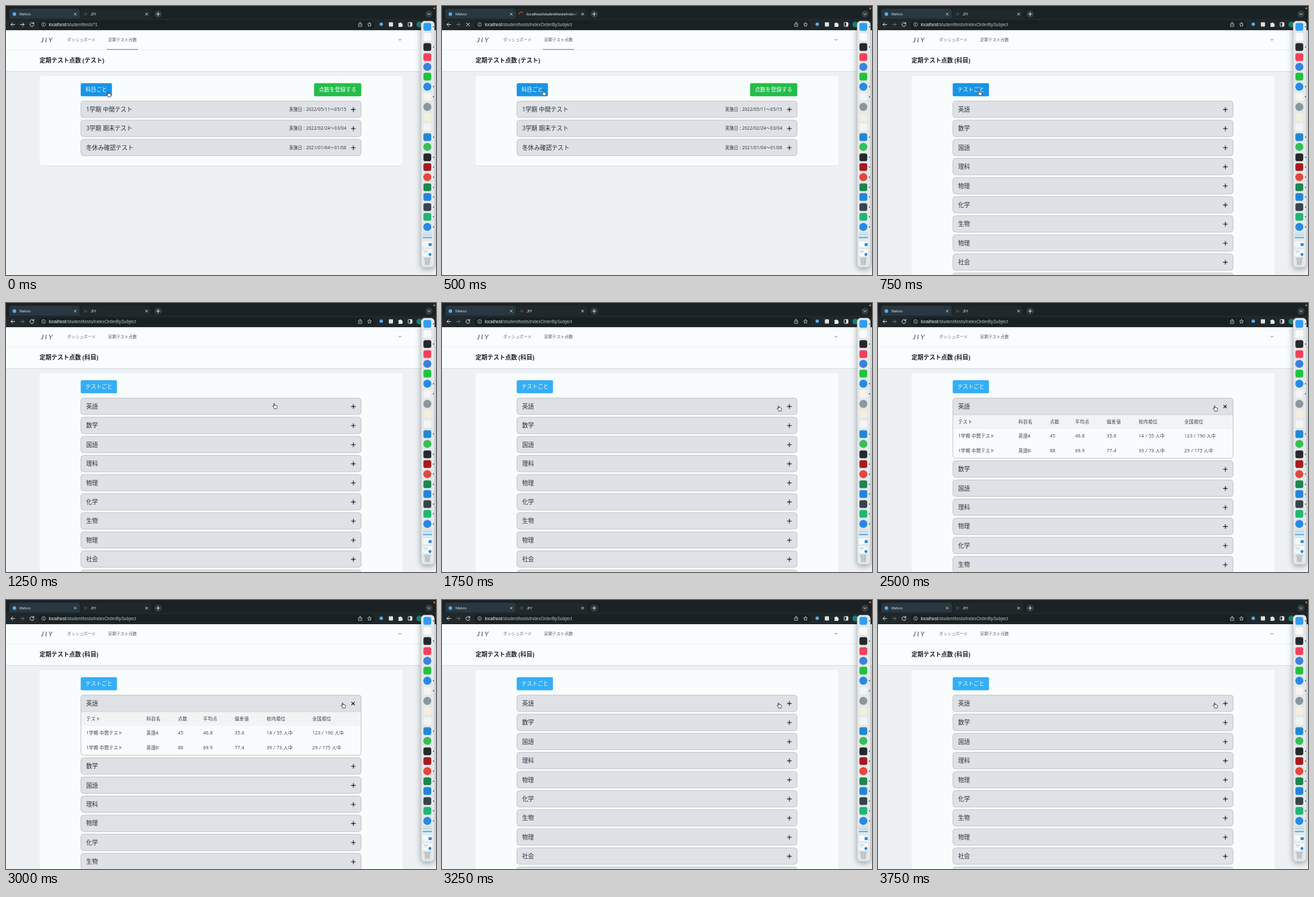
Animation, 640 px wide and 400 px high, one loop 4000 ms. Source, as an HTML page:

```html
<!DOCTYPE html>
<html lang="ja">
<head>
<meta charset="utf-8">
<title>Test scores</title>
<style>
html, body { margin: 0; width: 100%; height: 100%; overflow: hidden; background: #eef1f2; }
svg { display: block; width: 640px; height: 400px; font-family: "Open Sans", "Noto Sans CJK JP", "Noto Sans CJK", sans-serif; }
.ui { font-family: "Liberation Sans", Arial, sans-serif; }
.icon { fill: none; stroke: #dfe5e6; stroke-width: .9; stroke-linecap: round; stroke-linejoin: round; }
.panel { filter: drop-shadow(0 2px 4px rgba(20, 30, 35, .42)); }
text { white-space: pre; }
</style>
</head>
<body>
<svg id="stage" viewBox="0 0 640 400"></svg>
<script>
const INK = '#2b3037', PAPER = '#f9fcfc';

const rect = (x, y, w, h, fill, rx = 0, more = '') =>
  `<rect x="${x}" y="${y}" width="${w}" height="${h}" rx="${rx}" fill="${fill}" ${more}/>`;
const circle = (x, y, r, fill, more = '') =>
  `<circle cx="${x}" cy="${y}" r="${r}" fill="${fill}" ${more}/>`;
const text = (x, y, size, str, fill = INK, more = '') =>
  `<text x="${x}" y="${y}" font-size="${size}" fill="${fill}" ${more}>${str}</text>`;
const line = (d, stroke = '#dfe5e6', w = .9) =>
  `<path class="icon" d="${d}" style="stroke:${stroke};stroke-width:${w}"/>`;
const group = (id, body) => `<g id="${id}">${body}</g>`;
const plus = (x, y, r, color, w) => line(`M${x - r} ${y}h${2 * r}M${x} ${y - r}v${2 * r}`, color, w);
const cross = (x, y, r, color, w) => line(`M${x - r} ${y - r}l${2 * r} ${2 * r}m0 ${-2 * r}l${-2 * r} ${2 * r}`, color, w);

function browser() {
  const url = (id, rest) => group(id,
    `<text class="ui" x="63.5" y="29.6" font-size="6.63" fill="#b4bdc0"><tspan fill="#f4f7f7">localhost</tspan>${rest}</text>`);
  return rect(0, 0, 640, 36, '#1b2225') +
    rect(5, 4, 105, 17, '#283740', 4) +
    `<path d="M107 19q4 0 4-4V8q0-4 4-4h97q4 0 4 4v7q0 4 4 4z" fill="#20282b"/>` +
    rect(0, 18.5, 640, 17.5, '#20282b') +
    rect(48, 21.2, 501, 12.6, '#182022', 6.3) +
    circle(12.5, 12, 2.7, '#5aa9e6') +
    text(20, 14, 5.8, 'Melvio', '#d3dadc', 'class="ui"') +
    cross(103, 12, 1.7, '#c9d1d3', .8) + cross(209.3, 12, 1.7, '#e8eded', .8) +
    circle(226.5, 12, 5.6, '#30393d') + plus(226.5, 12, 2.4, '#dfe5e6', .9) +
    circle(629.5, 12, 5.2, '#343d41') + line('M627.6 11.2l1.9 1.9 1.9-1.9') +
    circle(637.3, 3.5, 1.3, '#e98a35') +
    group('favicon', rect(116, 10, 5, 4, '#343e42')) +
    group('spinner', line('M114.9 12a3.1 3.1 0 0 1 5.3-2.2', 'currentColor', 1)) +
    group('title', text(126, 14, 5.8, 'JIY', '#eef2f2', 'class="ui"')) +
    group('urlTitle', `<svg x="126" y="5" width="77" height="14">` +
      text(0, 9, 5.8, 'localhost/student/tests/indexOrder', 'url(#fade)', 'class="ui"') + '</svg>') +
    line('M13 27.5H7.4m2.5-2.6l-2.6 2.6 2.6 2.6') +
    group('forward', line('M21.3 27.5h5.6m-2.5-2.6l2.6 2.6-2.6 2.6', 'currentColor')) +
    group('reload', line('M40.9 25.7a2.9 2.9 0 1 0 .6 2.4M41.3 24.4v1.8h-1.9')) +
    group('stop', cross(38.6, 27.5, 2.2, '#e4eaea', 1)) +
    circle(56, 27.5, 2.8, 'none', 'stroke="#c3cccf" stroke-width=".7"') + line('M56 27.2v1.5M56 25.9v.1', '#c3cccf', .7) +
    url('urlA', '/student/tests?1') + url('urlB', '/student/tests/indexOrderBySubject') +
    line('M525.8 26.4h-1.1v4h4.8v-4h-1.1M527.1 28.6v-4.4m-1.3 1.2l1.3-1.3 1.3 1.3', '#cdd5d7', .7) +
    line('M541 24.5l.9 2 2.1.2-1.6 1.4.5 2.1-1.9-1.1-1.9 1.1.5-2.1-1.6-1.4 2.1-.2z', '#d4dcdd', .7) +
    circle(558.5, 27, 2.6, '#5aa9e6') + rect(569.8, 24.3, 6.2, 6.2, '#dde3e4', .8) +
    '<path d="M584 25.6h1.7a1.2 1.2 0 0 1 2.4 0h1.7v1.8a1.2 1.2 0 0 1 0 2.3v1.4H584v-1.5a1.2 1.2 0 0 0 0-2.2z" fill="#e5eaea"/>' +
    rect(598.6, 24.6, 5.6, 5.6, 'none', .6, 'stroke="#eef2f2" stroke-width=".9"') + rect(601.6, 24.6, 2.6, 5.6, '#eef2f2') +
    circle(615.2, 27.5, 4.3, '#16867a');
}

function header() {
  return rect(0, 36, 640, 61, '#fafdfd') + rect(0, 64.6, 640, .8, '#e8ecee') + rect(0, 96.8, 640, 1, '#d9dee0') +
    text(52, 53.8, 10.3, 'JIY', '#41464b', 'font-style="italic" letter-spacing="2.2" style="font-family:Lato,sans-serif"') +
    text(91, 52.3, 6.1, 'ダッシュボード', '#6d737b') +
    text(152, 52.3, 6.1, '定期テスト点数', '#545a62') +
    line('M584.6 49.3l1.8 1.8 1.8-1.8', '#596068', .8);
}

const heading = kind => text(50, 83.8, 8.8, `定期テスト点数 (${kind})`, '#20252c', 'font-weight="700"');
const button = (id, x, w, label, fill) =>
  rect(x, 114.7, w, 19.5, fill, 2, `id="${id}"`) + text(x + 7.1, 127.3, 8, label, '#f5fbff');

function row(y, label, date = '') {
  return rect(111.5, y - 12.2, 417, 24.4, '#dee1e5', 4, 'stroke="#bfc4c9" stroke-width=".9"') +
    text(119.3, y + 3.3, 8.8, label) +
    (date && text(506.7, y + 2.3, 6.3, `実施日 : ${date}`, INK, 'text-anchor="end" letter-spacing=".22"')) +
    plus(517, y + .3, 3, '#23272c', 1.1);
}
const rowY = i => 153.6 + 28.4 * i;

function testPage() {
  const tests = [
    ['1学期 中間テスト', '2022/05/11〜05/15'],
    ['3学期 期末テスト', '2022/02/24〜03/04'],
    ['冬休み確認テスト', '2021/01/04〜01/06']];
  return rect(50, 104.8, 540, 133, '#dde2e4', 3) + rect(50, 104, 540, 133, PAPER, 3) + heading('テスト') +
    rect(150, 64, 46.7, 1.1, '#5f94dc') +
    button('subjectButton', 111.2, 46.5, '科目ごと', '#1994e5') +
    button('addButton', 458.5, 70.3, '点数を登録する', '#24bd49') +
    tests.map((t, i) => row(rowY(i), ...t)).join('');
}

function scoreTable() {
  const columns = [119.5, 209, 256, 293.5, 340.5, 388, 456];
  const cells = (y, list, more) => list.map((s, i) => text(columns[i], y, 6.6, s, '#343a42', more)).join('');
  return rect(111.5, 141.4, 417, 89.4, PAPER, 4) +
    `<path d="M111.5 166v-20.6q0-4 4-4h409q4 0 4 4V166z" fill="#dee1e5"/>` +
    rect(112, 166, 416, 21.3, '#f1f4f5') + rect(112, 165.6, 416, .8, '#c6cacf') +
    rect(111.5, 141.4, 417, 89.4, 'none', 4, 'stroke="#bfc4c9" stroke-width=".9"') +
    text(119.3, 156.9, 8.8, '英語') + cross(516.6, 153.9, 2.1, '#23272c', 1.1) +
    cells(178.9, ['テスト', '科目名', '点数', '平均点', '偏差値', '校内順位', '全国順位'], 'font-weight="500" letter-spacing=".5"') +
    cells(200.4, ['1学期 中間テスト', '英語A', '45', '46.8', '35.6', '14 / 55 人中', '123 / 190 人中'], 'letter-spacing=".3"') +
    cells(221.6, ['1学期 中間テスト', '英語B', '88', '69.9', '77.4', '39 / 73 人中', '29 / 175 人中'], 'letter-spacing=".3"');
}

function subjectPage() {
  const subjects = ['英語', '数学', '国語', '理科', '物理', '化学', '生物', '物理', '社会', '地理'];
  const rows = subjects.map((s, i) => row(rowY(i), s));
  return rect(50, 104, 540, 300, PAPER, 3) + heading('科目') +
    button('testButton', 111.2, 54, 'テストごと', '#1994e5') +
    group('closedRow', rows[0]) + group('table', scoreTable()) +
    group('otherRows', rows.slice(1).join(''));
}

function dock() {
  // shape (square or circle), y, colour, running
  const apps = [
    ['s', 31, '#2f9df0', 1], ['s', 46, '#fafafa'], ['s', 61, '#25292b', 1], ['s', 76, '#f5405a'],
    ['c', 90.5, '#3f7fdc'], ['s', 105, '#20c33c'], ['c', 120, '#2789e6', 1], ['s', 135, '#f4f4f2', 1],
    ['c', 150, '#8b979c'], ['s', 165, '#f3eedd'], ['s', 180, '#f3f5f5'], ['s', 195, '#2487d2', 1],
    ['c', 209.5, '#39bd57'], ['s', 225, '#25292b', 1], ['s', 239.5, '#a51b1f', 1], ['c', 254.5, '#e2483b', 1],
    ['s', 269.5, '#1d8650', 1], ['s', 284, '#2285dc', 1], ['s', 299, '#39434c', 1], ['s', 313.5, '#22b573', 1],
    ['c', 328.5, '#2789e6', 1]];
  const icon = ([shape, y, color, on]) =>
    (shape === 's' ? rect(621.3, y - 5.7, 11.6, 11.4, color, 2.8) : circle(627.1, y, 6, color)) +
    (on ? `<path d="M636.8 ${y - 1.3}v2.6l-1.7-1.3z" fill="#33383b"/>` : '');
  return rect(618, 22.5, 19.5, 366, '#e3e8ea', 5, 'class="panel" stroke="#cbd2d5" stroke-width=".6"') +
    apps.map(icon).join('') +
    rect(621, 336.6, 13, .6, '#bcc5c9') +
    rect(620.5, 339.5, 13.5, 1, '#8dc8ee') + rect(620.5, 343.5, 13.5, 1.7, '#40a9e8') +
    rect(620.5, 350, 13.5, 8.5, '#f7fafb') + rect(629, 352.5, 4.6, 4.6, '#3388d8', 1) +
    rect(620.5, 362, 13.5, 10, '#f7fafb') + rect(622, 364, 6, .8, '#74bce9') +
    rect(622, 366.5, 5, .8, '#a9d2ec') + circle(631, 369.5, 2.2, '#3388d8') +
    `<path d="M622.4 375h9.6l-1.2 10.5h-7.2z" fill="#c9cfd2"/>` + line('M622.4 375h9.6M625.2 377l.5 6.8M629.2 377l-.5 6.8', '#92999d', .6);
}

const hand = `<path d="M-1.7 .8V-3.2q0-.9.8-.9t.8.9v2.5q.1-.7.8-.6.7 0 .8.7.2-.5.8-.4.6.1.7.7.9-.2 1 .8v1.4q0 1-.6 1.8v1H-.9v-.9L-3.2.9q-.4-.8.2-1.1.7-.2 1.3 1z"
  transform="scale(.88)" fill="#fff" stroke="#1d2124" stroke-width=".85" stroke-linejoin="round"/>`;

document.getElementById('stage').innerHTML =
  `<defs><linearGradient id="fade" gradientUnits="userSpaceOnUse" x1="66" x2="78"><stop stop-color="#eef2f2"/><stop offset="1" stop-color="#eef2f2" stop-opacity="0"/></linearGradient></defs>` +
  rect(0, 36, 640, 364, '#eef1f3') + header() + group('tests', testPage()) + group('subjects', subjectPage()) +
  browser() + dock() + group('cursor', hand);

// stage: 0 idle, 1 waiting, 2 receiving, 3 subject list, 4 list without hover, 5 first subject open
const steps = [
  { t: 0, stage: 0, x: 152.8, y: 131 },
  { t: 250, stage: 1, x: 151.2, y: 129 },
  { t: 500, stage: 2, x: 151.2, y: 129 },
  { t: 750, stage: 3, x: 151.2, y: 129 },
  { t: 1000, stage: 4, x: 205, y: 136 },
  { t: 1250, stage: 4, x: 400, y: 153 },
  { t: 1500, stage: 4, x: 499, y: 156.6 },
  { t: 1750, stage: 4, x: 501.8, y: 156.6 },
  { t: 2000, stage: 5, x: 501.8, y: 156.6 },
  { t: 3250, stage: 4, x: 501.8, y: 156.6 }];

const $ = id => document.getElementById(id);
const show = (id, on) => { $(id).style.display = on ? '' : 'none'; };
let current;

function draw(time) {
  const step = steps.findLast(s => s.t <= time);
  if (step === current) return;
  current = step;
  const { stage, x, y } = step;
  const loading = stage === 1 || stage === 2;
  const committed = stage >= 2, loaded = stage >= 3, open = stage === 5;
  show('tests', !loaded);
  show('subjects', loaded);
  show('favicon', !loading);
  show('spinner', loading);
  show('reload', !loading);
  show('stop', loading);
  show('title', stage !== 2);
  show('urlTitle', stage === 2);
  show('urlA', !committed);
  show('urlB', committed);
  show('closedRow', !open);
  show('table', open);
  $('spinner').style.color = committed ? '#d9683c' : '#98a3a7';
  $('forward').style.color = committed ? '#6a7579' : '#dfe5e6';
  $('testButton').setAttribute('fill', stage >= 4 ? '#34aef6' : '#1994e5');
  $('otherRows').setAttribute('transform', `translate(0 ${open ? 64.9 : 0})`);
  $('cursor').setAttribute('transform', `translate(${x} ${y})`);
}

const start = performance.now();
function tick() {
  draw((performance.now() - start) % 4000);
  requestAnimationFrame(tick);
}
tick();
</script>
</body>
</html>
```
